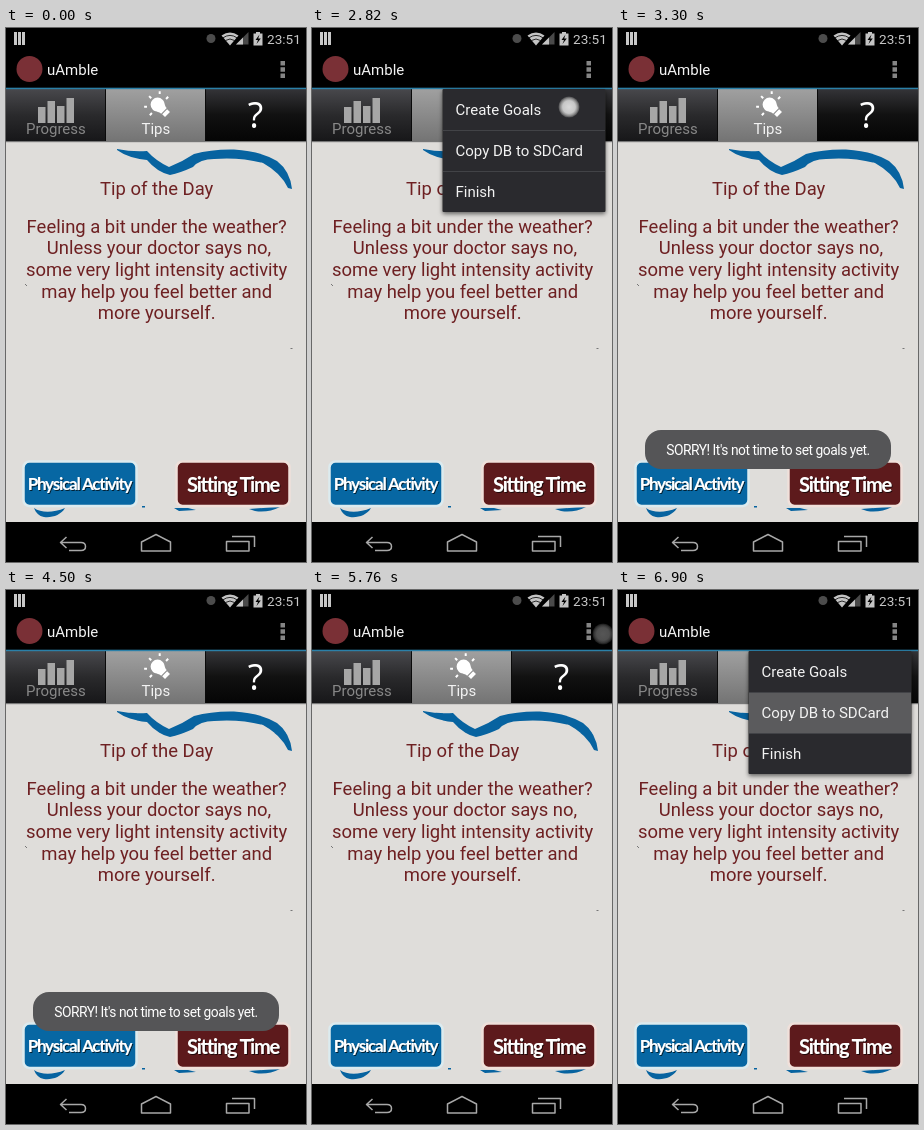
Recreate the animation shown at these times as an HTML page. Size 300 by 534 pixels, loop 8 s.

```html
<!DOCTYPE html>
<html lang="en">
<head>
<meta charset="utf-8">
<style>
  html, body { margin: 0; width: 100%; height: 100%; overflow: hidden; background: #000; }
  svg { display: block; width: 100vw; height: 100vh; font-family: Roboto, sans-serif; }
  .tip { font-size: 18.45px; fill: #6e2022; text-anchor: middle; }
  .bar { font-size: 15px; fill: #f3f3f3; }
  .button { font: bold 17px Lato, sans-serif; letter-spacing: -1.2px; fill: #fff; text-anchor: middle; }
  .line { fill: none; stroke: #a8a8a8; stroke-width: 1.5; stroke-linejoin: round; }
</style>
</head>
<body>
<svg viewBox="0 0 300 534">
  <defs>
    <linearGradient id="darkTab" x2="0" y2="1">
      <stop stop-color="#48484c"/><stop offset=".5" stop-color="#2a2a2c"/><stop offset="1" stop-color="#171719"/>
    </linearGradient>
    <linearGradient id="litTab" x2="0" y2="1">
      <stop stop-color="#a0a0a0"/><stop offset="1" stop-color="#747474"/>
    </linearGradient>
    <linearGradient id="blackTab" x2="0" y2="1">
      <stop stop-color="#343438"/><stop offset=".5" stop-color="#111"/><stop offset="1" stop-color="#050505"/>
    </linearGradient>
    <radialGradient id="touch">
      <stop stop-color="#e2e2e2"/><stop offset=".6" stop-color="#cfcfcf"/>
      <stop offset=".82" stop-color="#929292"/><stop offset="1" stop-color="#777" stop-opacity=".5"/>
    </radialGradient>
    <filter id="shadow" x="-20%" y="-20%" width="140%" height="150%">
      <feDropShadow dx="0" dy="2" stdDeviation="2" flood-opacity=".55"/>
    </filter>
    <filter id="textShadow">
      <feDropShadow dx="1" dy="1" stdDeviation=".6" flood-opacity=".7"/>
    </filter>
  </defs>

  <rect width="300" height="534"/>
  <rect y="114" width="300" height="380" fill="#dfddda"/>

  <!-- status bar -->
  <path d="M9.5 4v13M13.5 4v13M17.5 4v13" stroke="#c8c8c8" stroke-width="3"/>
  <circle cx="205" cy="10.5" r="4.5" fill="#4c4c4c"/>
  <path d="M215.5 7.5Q224 1.5 232.5 7.5L224 17.5Z" fill="#c4c4c4"/>
  <path d="M217 9.8Q224 5 231 9.8M219.500 12.500Q224 9.500 228.500 12.500" fill="none" stroke="#000" stroke-width=".8"/>
  <path d="M242.5 4V16.5H230Z" fill="#494949"/>
  <path d="M237 9.5V16.5H230Z" fill="#c4c4c4"/>
  <path d="M247.5 5.5H250V4H254V5.5H256.5V17.5H247.5Z" fill="#c4c4c4"/>
  <path d="M253.5 6.5L249.5 12H252L250.5 16L254.8 10.5H252.2Z"/>
  <text x="261" y="15.5" font-size="13.6" fill="#c8c8c8">23:51</text>

  <!-- title bar -->
  <circle cx="23.5" cy="41" r="13" fill="#7a3036"/>
  <text class="bar" x="41" y="47">uAmble</text>
  <path d="M274.5 33h4.500v4.500h-4.500zM274.500 39.300h4.500v4.500h-4.500zM274.500 45.600h4.500v4.500h-4.500z" fill="#858585"/>

  <!-- tabs -->
  <rect y="61" width="300" height="53" fill="#0a0a0a"/>
  <rect y="61" width="99" height="52" fill="url(#darkTab)"/>
  <rect x="100" y="61" width="99" height="52" fill="url(#litTab)"/>
  <rect x="200" y="61" width="100" height="52" fill="url(#blackTab)"/>
  <rect y="113" width="300" height="1.2" fill="#777"/>
  <rect y="59.700" width="300" height="1.500" fill="#2b80a8"/>
  <path d="M32 79h7.500v16h-7.500zM41.500 73h7.500v22h-7.500zM51 78h7.500v17h-7.500zM60.500 70h7.500v25h-7.500z" fill="#a6a6a6"/>
  <text x="20" y="106" font-size="15" fill="#888">Progress</text>
  <g transform="translate(153 78) rotate(-45)">
    <path d="M-4 7C-4 3-7 2-7-2A7 7 0 0 1 7-2C7 2 4 3 4 7ZM-3.5 8h7v4h-7z" fill="#fff"/>
    <path d="M0-11v-3M-9-8l-2-2M9-8l2-2M-10 0h-3M10 0h3" stroke="#fff" stroke-width="2"/>
  </g>
  <text class="bar" x="135.5" y="106">Tips</text>
  <text x="249.5" y="100" font-size="36" fill="#fff" text-anchor="middle" font-family="Open Sans, sans-serif">?</text>

  <!-- page -->
  <g fill="#0763a0">
    <path d="M111 121Q126 124 141 123Q150 133 163 139Q176 134 188 126Q206 121 228 121.500Q254 123 271 133Q284 143 286 161L282 160Q275 145 257 135Q234 129 208 131Q194 131 187 139Q174 145 164 147Q151 144 141 132Q122 130 111 122Z"/>
    <path d="M28 480C35 485 47 485 59 480C55 487 46 490 38 489C33 488 30 485 28 480ZM168 480h14l8 2-17 1zM243 481q14-1 31-2-12 6-25 4zM136 478h3v1.5h-3z"/>
  </g>
  <path d="M19 256l2 2M284.500 320.500h2" stroke="#777"/>
  <g class="tip">
    <text x="150.7" y="167">Tip of the Day</text>
    <text x="150.7" y="204.5">Feeling a bit under the weather?</text>
    <text x="153" y="226.2">Unless your doctor says no,</text>
    <text x="150.7" y="248">some very light intensity activity</text>
    <text x="150.7" y="269.7">may help you feel better and</text>
    <text x="150.7" y="291.4">more yourself.</text>
  </g>
  <g stroke-width="2.5">
    <rect x="17.5" y="433.5" width="113" height="44.500" rx="6" fill="#0767a3" stroke="#dcebef"/>
    <rect x="170.5" y="433.5" width="113" height="44.500" rx="6" fill="#5d1a1c" stroke="#f0e0da"/>
  </g>
  <g class="button" filter="url(#textShadow)">
    <text x="73.5" y="461.5">Physical Activity</text>
    <text x="227" y="463.5" style="font-size:20px">Sitting Time</text>
  </g>

  <!-- navigation bar -->
  <g class="line">
    <path d="M60.5 509L54.500 514.500L60.500 520M55 514.500H75Q79.500 514.500 79.500 518.500T75 522.500H63"/>
    <path d="M135.500 514L150 506.500L164.500 514V523H135.500Z"/>
    <path d="M220.500 513.500H243V523H220.500ZM226 508.500H248.500V519"/>
  </g>

  <g id="menu">
    <rect x="130.5" y="61" width="163" height="123" rx="1" fill="#2b2c2f" filter="url(#shadow)"/>
    <rect id="press" x="131" width="162" height="41" fill="#5b5b5d"/>
    <path d="M131 102.5h162M131 143.5h162" stroke="#424347"/>
    <g class="bar">
      <text x="143.5" y="87">Create Goals</text>
      <text x="143.5" y="127.5">Copy DB to SDCard</text>
      <text x="143.5" y="168.5">Finish</text>
    </g>
  </g>
  <g id="toast">
    <rect x="27" y="402" width="246" height="39" rx="16" fill="#555557"/>
    <text x="150" y="426.5" font-size="13.8" letter-spacing="-.47" fill="#fff" text-anchor="middle">SORRY! It's not time to set goals yet.</text>
  </g>
  <circle id="dot" r="10.5" fill="url(#touch)"/>
</svg>
<script>
  const [menu, press, toast, dot] = ['menu', 'press', 'toast', 'dot'].map(id => document.getElementById(id));
  const ramp = (t, from, to) => Math.min(1, Math.max(0, (t - from) / (to - from)));
  const pulse = (t, inStart, inEnd, outStart, outEnd) => ramp(t, inStart, inEnd) - ramp(t, outStart, outEnd);
  const show = (node, alpha) => node.setAttribute('opacity', alpha);

  // start, fade start, end, x, y
  const touches = [
    [720, 780, 870, 291, 44],
    [2820, 2860, 2960, 257, 79],
    [5640, 5700, 5800, 291, 44],
    [6480, 6660, 6880, 257, 123]
  ];

  function draw(now) {
    const t = Math.floor(now % 8000 / 20) * 20;
    show(menu, pulse(t, 780, 960, 2880, 3000) + ramp(t, 5760, 5940));
    show(toast, pulse(t, 2940, 3260, 5020, 5340));

    const pressedGoals = t >= 2880 && t < 3000;
    show(press, pressedGoals || t >= 6600 ? 1 : 0);
    press.setAttribute('y', pressedGoals ? 61 : 102);

    const touch = touches.find(([start, , end]) => t >= start && t < end);
    show(dot, touch ? .95 * (1 - ramp(t, touch[1], touch[2])) : 0);
    if (touch) dot.setAttribute('transform', `translate(${touch[3]} ${touch[4]})`);
    requestAnimationFrame(draw);
  }
  requestAnimationFrame(draw);
</script>
</body>
</html>
```
